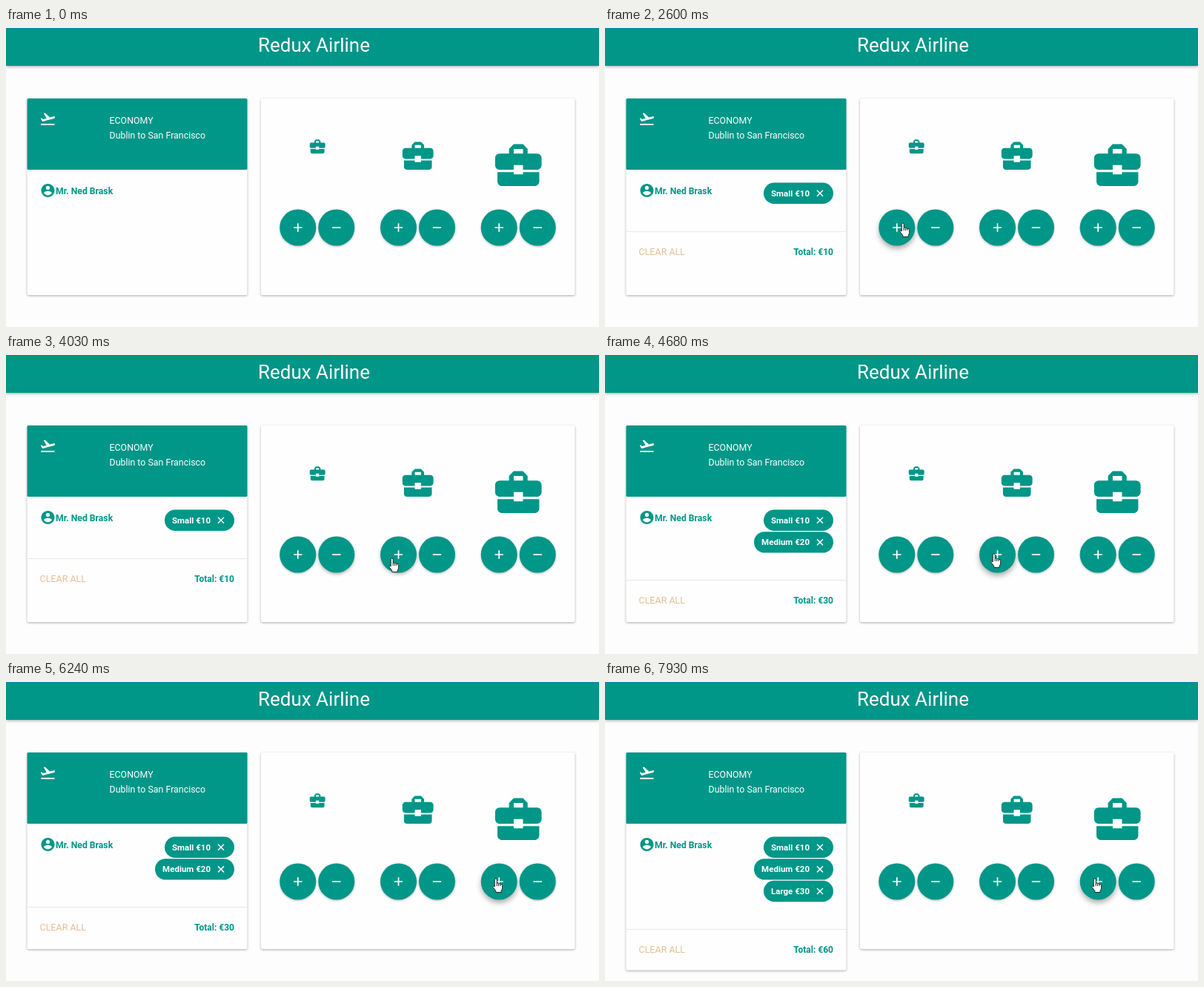
Recreate the animation shown at these times as an HTML page. Size 800 by 403 pixels, loop 8 s.

```html
<!DOCTYPE html>
<html lang="en">
<head>
<meta charset="utf-8">
<title>Redux Airline</title>
<style>
  html, body { margin: 0; width: 100%; height: 100%; overflow: hidden; background: #fdfdfd; }
  svg { display: block; width: 800px; height: 403px; font-family: Roboto, sans-serif; font-size: 12.4px; }
  .teal { fill: #009688; }
  .white { fill: #fff; }
  .bold { font-weight: 600; }
  .line { stroke: #fff; fill: none; }
  .card { fill: #fefefe; filter: drop-shadow(0 1px 1.5px rgba(0, 0, 0, .32)); }
  .bar { filter: drop-shadow(0 1px 2px rgba(0, 0, 0, .35)); }
  .cursor { fill: #fff; stroke: #222; stroke-linejoin: round; }
</style>
</head>
<body>
<svg id="stage" viewBox="0 0 800 403">
  <rect width="800" height="403" fill="#fdfdfd"/>
  <rect class="teal bar" y="-5" width="800" height="56"/>
  <rect width="800" height="1" fill="#1486a0"/>
  <text class="white" x="415.5" y="32" font-size="26" text-anchor="middle">Redux Airline</text>

  <rect id="order" class="card" x="28.5" y="95" width="297" height="265" rx="2"/>
  <rect class="teal" x="28.5" y="95" width="297" height="96" rx="1.5"/>
  <path class="white" transform="translate(45 111) scale(.95)" d="M2.5 19h19v2h-19zm19.57-9.36c-.21-.8-1.04-1.28-1.84-1.06L14.92 10l-6.9-6.43-1.93.51 4.14 7.17-4.97 1.33-1.97-1.54-1.45.39 1.82 3.16.77 1.33 1.6-.43 5.31-1.42 4.35-1.16L21 11.49c.81-.23 1.28-1.05 1.07-1.85z"/>
  <text class="white" x="139.5" y="129">ECONOMY</text>
  <text class="white" x="139.5" y="149">Dublin to San Francisco</text>
  <path class="teal" transform="translate(45.7 208.2) scale(.9)" d="M12 2C6.48 2 2 6.48 2 12s4.48 10 10 10 10-4.48 10-10S17.52 2 12 2zm0 3c1.66 0 3 1.34 3 3s-1.34 3-3 3-3-1.34-3-3 1.34-3 3-3zm0 14.2c-2.5 0-4.71-1.28-6-3.22.03-1.99 4-3.08 6-3.08 1.99 0 5.97 1.09 6 3.08-1.29 1.94-3.5 3.22-6 3.22z"/>
  <text class="teal bold" x="67" y="223.5" font-size="12.2">Mr. Ned Brask</text>
  <g id="chips"></g>
  <g id="footer">
    <rect x="28.5" width="297" height="1" fill="#e9e9e9"/>
    <text x="45.5" y="32" font-size="12.5" fill="#e4bf97">CLEAR ALL</text>
    <text id="total" class="teal bold" x="308" y="32" font-size="12" text-anchor="end"></text>
  </g>

  <rect class="card" x="344" y="95" width="423.5" height="265" rx="2"/>
  <g id="bags"></g>
  <path id="arrow" class="cursor" style="stroke:#2b5a5c" d="M.5 .5V14.5L3.8 11.6 6.1 16.6 8.3 15.6 6.1 10.8H10.4Z"/>
  <path id="hand" class="cursor" d="M-1.8 1.4Q-1.6 0 -.3 0Q1.2 0 1.2 1.5V6.4Q2.5 5.5 3.6 6.8Q5 6 6 7.4Q8.6 6.7 8.6 9.4V12.4Q8.4 15 7.1 16.4V18.5H-.2V16.6L-4 11.6Q-4.6 10 -3.2 9.7L-1.8 11Z M1.2 6.4V10M3.6 6.8V10M6 7.4V10"/>
</svg>
<script>
const LOOP = 8000, STEP = 130;
const BAG = "M10 16v-1H3.01L3 19c0 1.11.89 2 2 2h14c1.11 0 2-.89 2-2v-4h-7v1h-4zm10-9h-4.01V5l-2-2h-4l-2 2v2H4c-1.1 0-2 .9-2 2v3c0 1.11.89 2 2 2h6v-2h4v2h6c1.1 0 2-.9 2-2V9c0-1.1-.9-2-2-2zm-6 0h-4V5h4v2z";
const items = [
  { name: "Small", price: 10, left: 214, added: 2210 },
  { name: "Medium", price: 20, left: 201, added: 4550 },
  { name: "Large", price: 30, left: 214, added: 6630 }
];
// time, x, y of the pointer's tip
const path = [
  [910, 318, -18], [1430, 354, 123], [1820, 402, 263], [3510, 402, 263],
  [4030, 521, 274], [4290, 525, 268], [5070, 525, 268], [5330, 579, 263], [5850, 661, 265]
];
const $ = id => document.getElementById(id);

function add(parent, tag, attrs, text) {
  const node = document.createElementNS("http://www.w3.org/2000/svg", tag);
  for (const key in attrs) node.setAttribute(key, attrs[key]);
  if (text) node.textContent = text;
  return parent.appendChild(node);
}

const buttons = [];
function addButton(x, plus) {
  const circle = add($("bags"), "circle", { class: "teal", cx: x, cy: 269, r: 24.5 });
  const sign = `M${x - 5.7} 269h11.4` + (plus ? `M${x} 263.3v11.4` : "");
  add($("bags"), "path", { class: "line", d: sign, "stroke-width": 1.7 });
  buttons.push({ x, circle });
}

items.forEach((item, i) => {
  const mid = 420.2 + 135.5 * i, scale = 1.045 * (i + 1), top = 208.6 + 29.6 * i;
  add($("bags"), "path", {
    class: "teal", d: BAG, transform: `translate(${mid - 12 * scale} 147.2) scale(${scale})`
  });
  addButton(393.8 + 135.7 * i, true);
  addButton(445.8 + 135.7 * i, false);

  item.chip = add($("chips"), "g", {});
  add(item.chip, "rect", { class: "teal", x: item.left, y: top, width: 308 - item.left, height: 28.4, rx: 14.2 });
  add(item.chip, "text", {
    class: "white bold", x: 276, y: top + 18.2, "font-size": 11.5, "text-anchor": "end"
  }, `${item.name} €${item.price}`);
  add(item.chip, "path", {
    class: "line", d: `M286 ${top + 10.2}l8 8m0-8l-8 8`, "stroke-width": 1.5
  });
});

function pointer(t) {
  const next = path.findIndex(p => p[0] > t);
  if (next < 0) return path[path.length - 1].slice(1);
  if (next === 0) return [-50, -50];
  const [t0, x0, y0] = path[next - 1], [t1, x1, y1] = path[next];
  const k = (t - t0) / (t1 - t0);
  return [x0 + (x1 - x0) * k, y0 + (y1 - y0) * k];
}

function isOver(button, t) {
  const [x, y] = pointer(t);
  return Math.hypot(x - button.x, y - 269) < 24.5;
}

// Share of the last 300 ms spent over the button
function lift(button, t) {
  let hits = 0;
  for (let i = 0; i < 10; i++) hits += isOver(button, t - i * 30);
  return hits / 10;
}

function show(node, on) {
  node.style.display = on ? "" : "none";
}

function draw(now) {
  const t = Math.floor((now % LOOP) / STEP) * STEP;
  const bought = items.filter(item => t >= item.added);
  const divider = 244.4 + 29.5 * bought.length;

  items.forEach(item => show(item.chip, t >= item.added));
  show($("footer"), bought.length > 0);
  $("footer").setAttribute("transform", `translate(0 ${Math.round(divider)})`);
  $("total").textContent = "Total: €" + bought.reduce((sum, item) => sum + item.price, 0);
  $("order").setAttribute("height", Math.max(360, divider + 55.5) - 95);

  for (const button of buttons) {
    const k = lift(button, t);
    button.circle.style.filter =
      `drop-shadow(0 ${1.5 + 3 * k}px ${1.5 + 2 * k}px rgba(0,0,0,${.28 + .04 * k}))`;
  }

  const [x, y] = pointer(t);
  const over = buttons.some(button => isOver(button, t));
  show($("hand"), over);
  show($("arrow"), !over);
  $(over ? "hand" : "arrow").setAttribute("transform", `translate(${x} ${y})`);
}

function tick() {
  draw(performance.now());
  requestAnimationFrame(tick);
}
tick();
</script>
</body>
</html>
```
